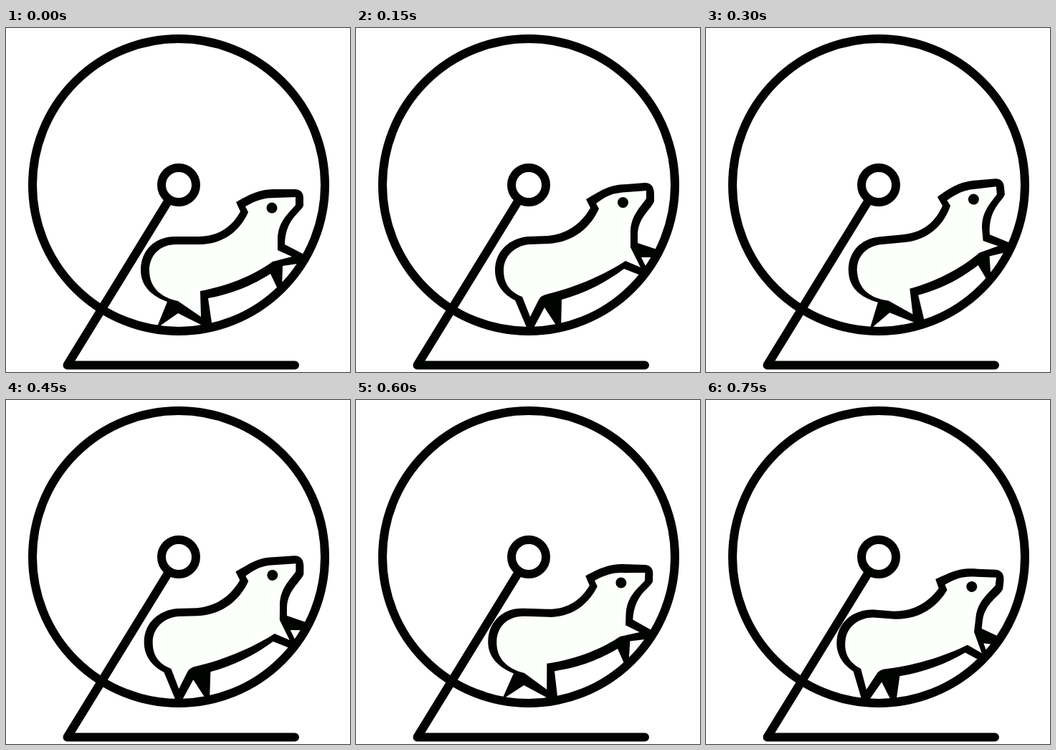
An HTML page for the animation above (900 ms loop, 480x480 px).

```html
<!DOCTYPE html>
<html lang="en">
<head>
<meta charset="utf-8">
<title>Hamster wheel</title>
<style>
  html, body { margin: 0; width: 100%; height: 100%; overflow: hidden; background: #fff; }
  svg { display: block; width: 100vw; height: 100vh; }
  .line { fill: none; stroke: #010301; stroke-width: 12; stroke-linecap: round; stroke-linejoin: round; }
  .hub { fill: #fff; }
  .dark { fill: #010301; }
  .fur { fill: #fdfffc; }
  #hamster { transform-origin: 241px 219px; }
</style>
</head>
<body>
<svg viewBox="0 0 480 480">
  <clipPath id="inside"><circle cx="241" cy="219" r="207"/></clipPath>

  <path class="line" d="M240 219 L85.500 470.500 H403"/>
  <circle class="line" cx="241" cy="219" r="204"/>
  <circle class="line hub" cx="241" cy="219" r="24"/>

  <g clip-path="url(#inside)">
    <g id="hamster">
      <g id="reach">
        <path class="dark" d="M188 338 C188 310 208 291 236 291 H268
          C298 291 316 276 327 256 L321 243 C345 229 355 226 372 225 H404
          Q415 226 415 238 V248 C411 258 390 266 389 302
          L416 316 L420 322 L413 328 L386 332 L385 364 L380 366 L369 343
          C345 358 320 370 282 377 L288 418 H280 L240 398 L210 419 L225 382
          C206 375 188 362 188 338Z"/>
        <path class="fur" d="M200 338 C200 318 214 302 238 302 H270
          C304 302 327 282 338 257 L334 249 C350 240 360 237 374 237 L404 236
          V247 C394 259 379 270 379 296 V310 L399 319 L372 326
          C350 342 315 359 271 367 L272 403 L240 381
          C216 376 200 362 200 338Z"/>
        <circle class="dark" cx="371" cy="251" r="7.5"/>
      </g>
      <g id="gather">
        <path class="dark" d="M194 338 C194 310 216 293 240 291 L268 290
          C298 287 316 270 327 251 L321 239 C345 225 352 219 378 218 L403 216
          Q416 216 416 232 V242 C411 254 394 264 393 288 V300
          L420 309 V320 H398 L405 334 L412 343 L402 347 L374 336
          C350 354 320 370 287 379 L286 419 H282 L263 390 L247 420 H239 L222 380
          C206 372 194 358 194 338Z"/>
        <path class="fur" d="M206 338 C206 318 222 304 241 302 L268 301
          C305 299 328 277 339 252 L335 245 C350 234 358 230 378 229 L405 227
          V238 C397 250 383 262 383 285 V306 L397 334 L376 325
          C350 342 310 361 268 371 Q257 373 254 381 L243 403 L232 375
          C214 368 206 356 206 338Z"/>
        <circle class="dark" cx="372.500" cy="243.500" r="7.5"/>
      </g>
    </g>
  </g>
</svg>
<script>
  const STEP = 150;
  // Each stride: pose, swing about the axle in degrees, then a small shift.
  const strides = [
    ["reach", 0, 0, 0],
    ["gather", 0, 0, 0],
    ["reach", -5.2, 0, 0],
    ["gather", 0.4, -0.5, 0],
    ["reach", 1.8, 0, 0],
    ["gather", 6.6, 2, 2]
  ];
  const hamster = document.getElementById("hamster");
  const poses = ["reach", "gather"].map(id => document.getElementById(id));
  let shown = -1;

  function draw(now) {
    const index = Math.floor(now / STEP) % strides.length;
    if (index !== shown) {
      const [pose, angle, x, y] = strides[shown = index];
      hamster.style.transform = `translate(${x}px, ${y}px) rotate(${angle}deg)`;
      for (const p of poses) p.style.display = p.id === pose ? "" : "none";
    }
  }

  const start = performance.now();
  function tick() {
    draw(performance.now() - start);
    requestAnimationFrame(tick);
  }
  tick();
</script>
</body>
</html>
```
